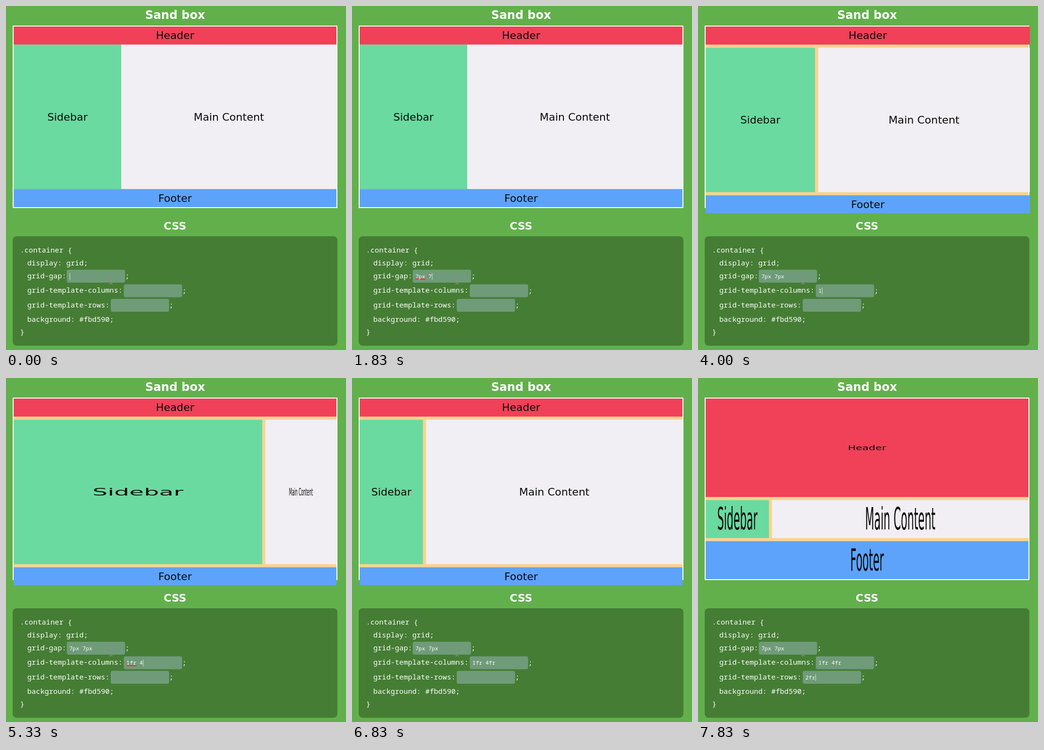
An HTML page that plays this animation: 711x720 px, repeating every 8 s.

```html
<!DOCTYPE html>
<html lang="en">
<head>
<meta charset="utf-8">
<title>Grid sand box</title>
<style>
  html, body { margin: 0; width: 100%; height: 100%; overflow: hidden; background: #62b04c; }
  svg { display: block; width: 100%; height: 100%; }
  .title { font: bold 24px "DejaVu Sans", sans-serif; fill: #fff; text-anchor: middle; }
  .label { font: 22px "DejaVu Sans", sans-serif; fill: #0b0b0b; text-anchor: middle; }
  .code, .value { font: 15.1px "Noto Sans Mono", monospace; fill: #fff; white-space: pre; }
  .value { font-size: 11.4px; }
  .field { fill: #6f9b79; }
  .caret { fill: #d8e6da; }
  .squiggle { fill: none; stroke: #d8323c; stroke-width: 1.4; }
  .pointer { fill: none; stroke: #85908a; stroke-width: 1.3; }
</style>
</head>
<body>
<svg viewBox="0 0 711 720" preserveAspectRatio="none">
  <rect width="711" height="720" fill="#62b04c"/>
  <text class="title" x="353.5" y="27">Sand box</text>
  <rect x="15" y="42" width="677" height="380" fill="#f9d392" stroke="#fff" stroke-width="2"/>
  <g id="items"></g>
  <text class="title" x="353.5" y="468" style="font-size:22px">CSS</text>
  <rect x="14" y="482" width="679" height="229" rx="8" fill="#457d34"/>
  <g class="code">
    <text x="29.5" y="516">.container {</text>
    <text x="44.5" y="543">display: grid;</text>
    <text x="44.5" y="570">grid-gap:</text>
    <text x="44.5" y="600">grid-template-columns:</text>
    <text x="44.5" y="630.5">grid-template-rows:</text>
    <text x="44.5" y="660.5">background: #fbd590;</text>
    <text x="29.5" y="687">}</text>
  </g>
  <g id="fields"></g>
  <path class="pointer" d="M216 566.5h2.5l1 1l1-1h2.5M219.5 567.5v13M216 581.5h2.5l1-1l1 1h2.5"/>
</svg>
<script>
const LOOP = 8000, STEP = 1000 / 6, MOVE = 250, BLINK = 500, CHAR = 6.84;
const GRID = { x: 16, y: 43, w: 675, h: 378, pxScale: 6.5 / 7 };

// Each entry: time, field index, text in that field
const KEYS = [
  [0, 0, ''], [330, 0, '7'], [620, 0, '7p'], [800, 0, '7px'], [1010, 0, '7px '],
  [1560, 0, '7px 7'], [1840, 0, '7px 7p'], [2080, 0, '7px 7px'],
  [3100, 1, ''], [3835, 1, '1'], [4080, 1, '1f'], [4260, 1, '1fr'], [4600, 1, '1fr '],
  [5320, 1, '1fr 4'], [5580, 1, '1fr 4f'], [5740, 1, '1fr 4fr'],
  [6330, 2, ''], [7440, 2, '2'], [7590, 2, '2f'], [7715, 2, '2fr']
];

const ITEMS = [
  { name: 'Header', color: '#f04158', col: 0, span: 3, row: 0 },
  { name: 'Sidebar', color: '#6bdaa0', col: 0, span: 1, row: 1 },
  { name: 'Main Content', color: '#f1eff3', col: 1, span: 2, row: 1 },
  { name: 'Footer', color: '#5da3fc', col: 0, span: 3, row: 2 }
];
const FIELDS = [{ x: 127, y: 552 }, { x: 246.3, y: 582.5 }, { x: 219, y: 613 }];

function add(parent, tag, attrs, text = '') {
  const el = document.createElementNS('http://www.w3.org/2000/svg', tag);
  for (const key in attrs) el.setAttribute(key, attrs[key]);
  el.textContent = text;
  return parent.appendChild(el);
}
const set = (el, attrs) => { for (const key in attrs) el.setAttribute(key, attrs[key]); };
const sum = list => list.reduce((a, b) => a + b, 0);
const mix = (a, b, p) => a + (b - a) * p;
const ease = t => t < .5 ? 2 * t * t : 1 - 2 * (1 - t) ** 2;

function gapSize(value) {
  return /^(\d+px ?)+$/.test(value) ? parseInt(value) * GRID.pxScale : 0;
}

// Empty values use percentages; invalid ones fall back to auto tracks
function tracks(value, size, gap, mins, shares) {
  if (!value) return shares.map(s => s * size);
  const fr = /^(\d+fr ?)+$/.test(value) ? value.match(/\d+/g).map(Number) : [];
  const base = mins.map((m, i) => i < fr.length || fr.length > 1 ? 0 : m);
  const free = size - 2 * gap - sum(base);
  return base.map((b, i) => fr.length ? b + free * (fr[i] || 0) / sum(fr) : b + free / 3);
}

function layout([gapText, colText, rowText]) {
  const gap = gapSize(gapText), half = (147 - gap) / 2;
  const cols = tracks(colText, GRID.w, gap, [84, half, half], [1 / 3, 1 / 3, 1 / 3]);
  const rows = tracks(rowText, GRID.h, gap, [27.5, 27.5, 27.5], [.1, .8, .1]);
  return ITEMS.map(({ col, span, row }) => ({
    x: GRID.x + sum(cols.slice(0, col)) + gap * col,
    y: GRID.y + sum(rows.slice(0, row)) + gap * row,
    w: sum(cols.slice(col, col + span)) + gap * (span - 1),
    h: rows[row]
  }));
}

const values = ['', '', ''];
const states = KEYS.map(([time, field, text]) => {
  values[field] = text;
  return { time, field, texts: [...values], boxes: layout(values) };
});

const itemLayer = document.getElementById('items');
const items = ITEMS.map(({ name, color }) => ({
  rect: add(itemLayer, 'rect', { fill: color }),
  label: add(itemLayer, 'text', { class: 'label', y: 7.5 }, name)
}));

const fieldLayer = document.getElementById('fields');
const wave = 'M0 1' + 'l1.7 -1.6l1.7 1.6'.repeat(6);
const fields = FIELDS.map(({ x, y }) => {
  const g = add(fieldLayer, 'g', { transform: `translate(${x} ${y})` });
  add(g, 'rect', { class: 'field', width: 122, height: 27, rx: 4 });
  add(g, 'text', { class: 'code', x: 122, y: 18 }, ';');
  return {
    squiggle: add(g, 'path', { class: 'squiggle', d: wave, transform: 'translate(5.8 19.3)' }),
    value: add(g, 'text', { class: 'value', x: 5.5, y: 17.8 }),
    caret: add(g, 'rect', { class: 'caret', y: 7, width: 1, height: 14 })
  };
});

function draw(t) {
  const index = states.findLastIndex(s => s.time <= t);
  const now = states[index], before = states[Math.max(0, index - 1)];
  const age = t - now.time, p = ease(Math.min(1, age / MOVE));

  items.forEach(({ rect, label }, i) => {
    const a = before.boxes[i], b = now.boxes[i];
    const [x, y, w, h] = ['x', 'y', 'w', 'h'].map(k => mix(a[k], b[k], p));
    set(rect, { x, y, width: w, height: h });
    set(label, { transform: `translate(${x + w / 2} ${y + h / 2}) scale(${w / b.w} ${h / b.h})` });
  });

  fields.forEach(({ squiggle, value, caret }, i) => {
    const text = now.texts[i], active = now.field === i;
    value.textContent = text;
    set(caret, { x: 6 + text.length * CHAR, opacity: +(active && Math.floor(age / BLINK) % 2 === 0) });
    set(squiggle, { opacity: +(active && text.includes(' ')) });
  });
}

// The screen refreshes six times a second
const start = performance.now();
function tick() {
  const t = (performance.now() - start) % LOOP;
  draw(Math.floor((t + 4) / STEP) * STEP % LOOP);
  requestAnimationFrame(tick);
}
tick();
</script>
</body>
</html>
```
